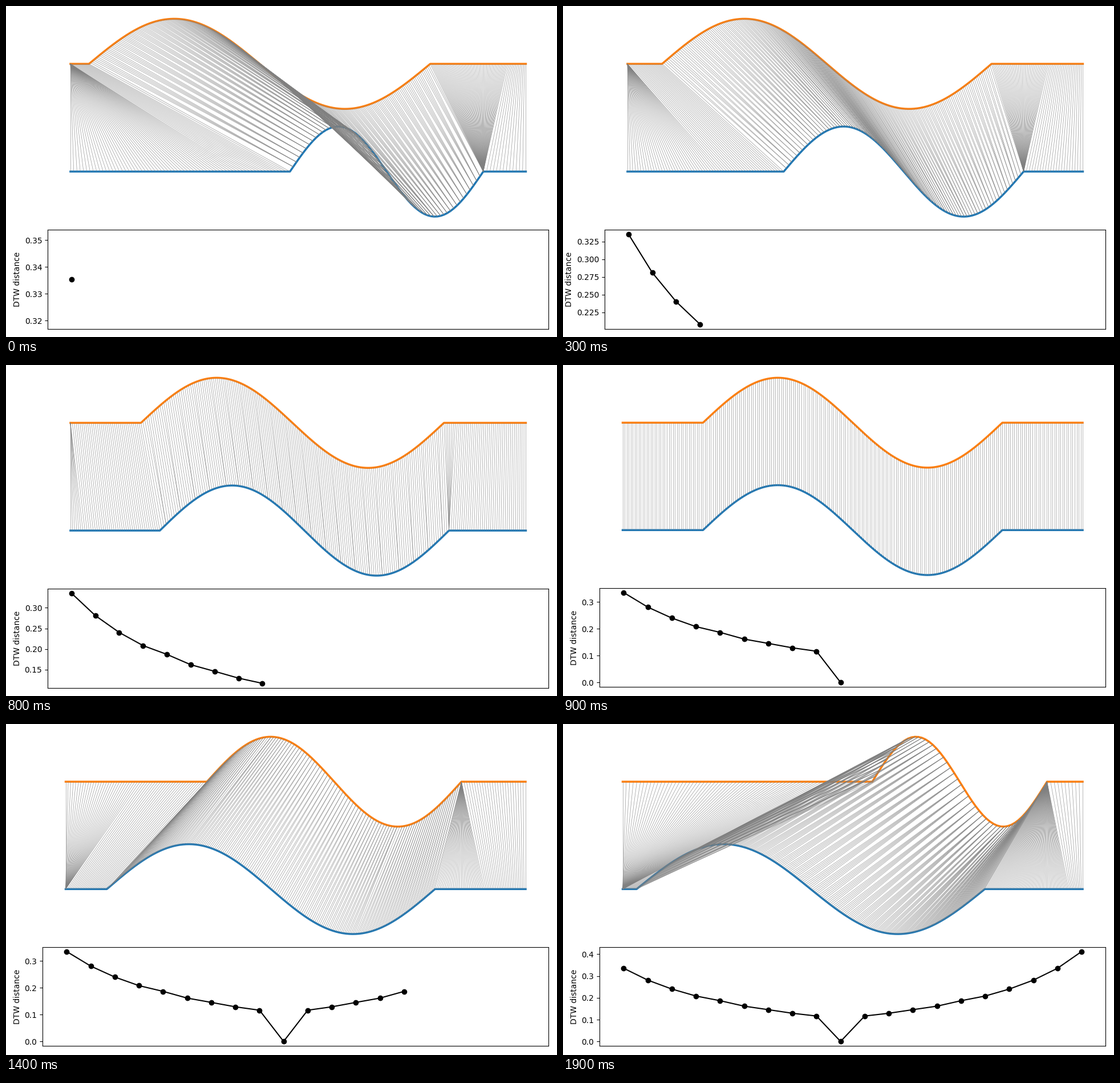
These frames come from a looping animation (966 by 580 pixels, 2000 ms). A matplotlib script:

```python
import numpy as np
import matplotlib.pyplot as plt
from matplotlib.animation import FuncAnimation
from matplotlib.collections import LineCollection

W, H, DPI = 966, 580, 100
FRAMES = 20


def wave(k):
    """One sine period between two flat stretches whose lengths depend on k."""
    period = np.sin(np.linspace(0, 2 * np.pi, 240 - 10 * k))
    return np.concatenate([np.zeros(13 + 3 * k), period, np.zeros(67 - 3 * k)])


def dtw(a, b):
    """Return the warping distance and the best path as index pairs."""
    inf = float("inf")
    acc = [[0.0] + [inf] * len(b)]
    for row in ((a[:, None] - b) ** 2).tolist():
        prev, cur = acc[-1], [inf]
        for j, cost in enumerate(row):
            cur.append(cost + min(prev[j], prev[j + 1], cur[j]))
        acc.append(cur)

    i, j = len(a), len(b)
    path = []
    while i > 0 and j > 0:
        path.append((i - 1, j - 1))
        steps = [(i - 1, j - 1), (i - 1, j), (i, j - 1)]
        i, j = min(steps, key=lambda s: acc[s[0]][s[1]])
    return acc[-1][-1] ** 0.5, np.array(path[::-1])


pairs = [(wave(k), wave(18 - k)) for k in range(FRAMES)]
results = [dtw(a, b) for a, b in pairs]
distances = [r[0] for r in results]

fig, (top, mid, chart) = plt.subplots(3, 1, figsize=(W / DPI, H / DPI), dpi=DPI)
fig.patch.set_facecolor("white")
curves = []
for ax, color in ((top, "C1"), (mid, "C0")):
    ax.axis("off")
    ax.set_xlim(-0.05, 1.05)
    ax.set_ylim(-1.1, 1.1)
    curves += ax.plot([], [], color=color, lw=2.5)

links = LineCollection([], colors="gray", linewidths=0.5, alpha=0.8,
                       transform=fig.transFigure)
fig.add_artist(links)


def place(left, bottom):
    fig.subplots_adjust(left=left / W, right=951.4 / W, top=1 - 14.5 / H,
                        bottom=1 - bottom / H, hspace=0.0866)


def to_figure(ax, points):
    return fig.transFigure.inverted().transform(ax.transData.transform(points))


def draw(k):
    # The margin shrinks once the tick labels need only one decimal.
    if k < 9:
        place(73, 565.7)
    else:
        place(64.2, 564.1)

    ends = []
    path = results[k][1]
    for n, (ax, curve) in enumerate(zip((top, mid), curves)):
        y = pairs[k][n]
        x = np.linspace(0, 1, len(y))
        curve.set_data(x, y)
        idx = path[:, n]
        ends.append(to_figure(ax, np.column_stack([x[idx], y[idx]])))
    links.set_segments(np.stack(ends, axis=1))

    chart.clear()
    chart.plot(range(k + 1), distances[:k + 1], "ko-")
    chart.set_xlim(-1, FRAMES)
    chart.set_xticks([])
    chart.set_ylabel("DTW distance")
    return []


anim = FuncAnimation(fig, draw, frames=FRAMES, init_func=lambda: draw(0),
                     interval=100, repeat=True, repeat_delay=0, blit=False)
plt.show()
```
